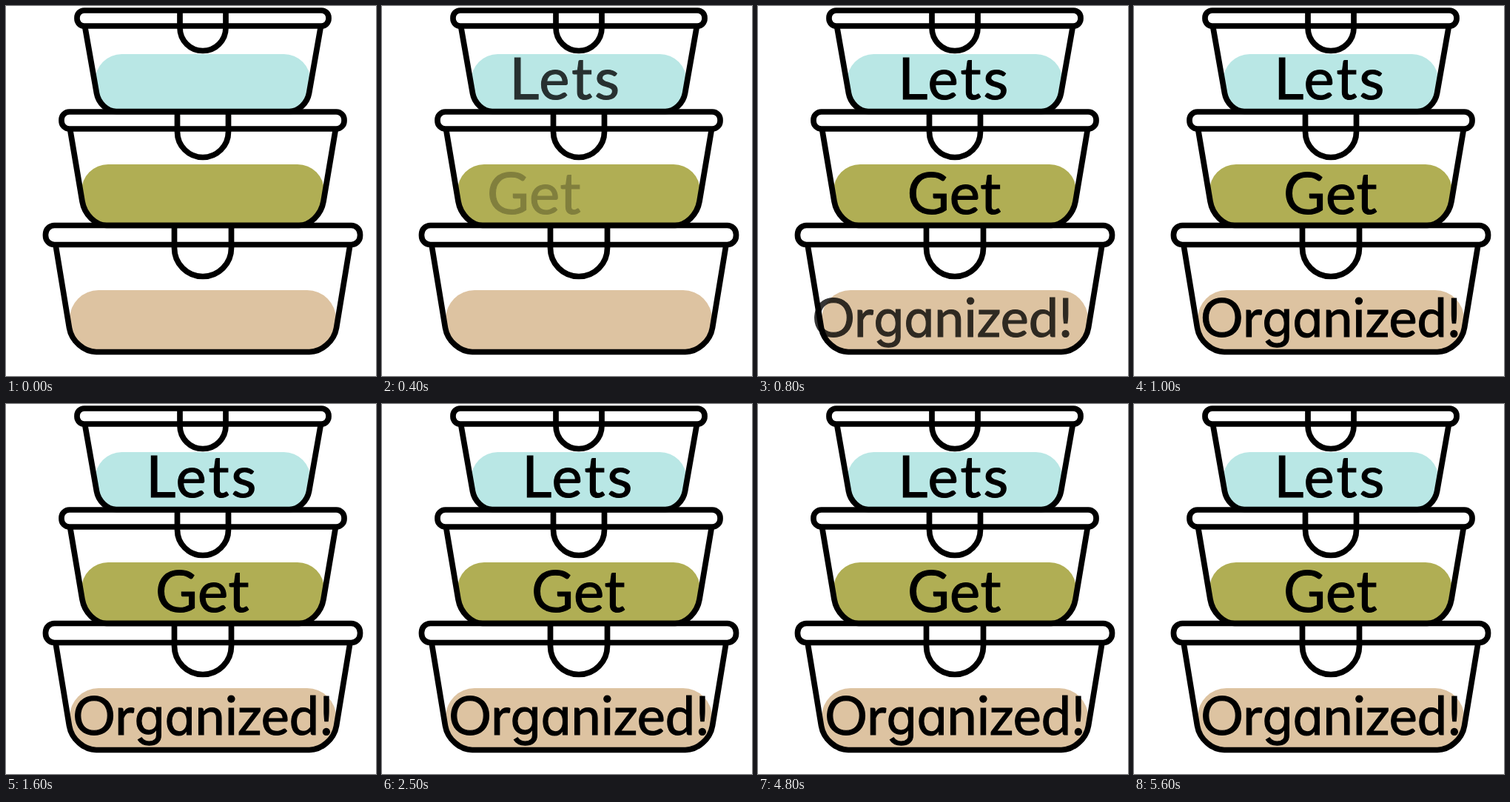
An HTML page for the animation above (6000 ms loop, 500 by 500 pixels).

```html
<!DOCTYPE html>
<html lang="en">
<head>
<meta charset="utf-8">
<title>Stacked containers</title>
<style>
  html, body { margin: 0; width: 100%; height: 100%; overflow: hidden; background: #fff; }
  svg { display: block; width: 100vw; height: 100vh; }
  .line { fill: none; stroke: #000; stroke-width: 7.7; stroke-linejoin: round; }
  text { font-family: Lato, sans-serif; fill: #000; stroke: #000; stroke-width: 1.2; white-space: pre; }
  .round { font-family: Inter, sans-serif; font-size: 0.93em; font-feature-settings: "cv11"; }
</style>
</head>
<body>
<svg id="stage" viewBox="0 0 500 500"></svg>
<script>
const LOOP = 6000, STEP = 100;
const CX = 266;
const stage = document.getElementById('stage');

// Widths are half-widths measured from the centre line.
const boxes = [
  { lid: { top: 6, bottom: 27, half: 170 }, tab: { half: 31, bottom: 60.5 },
    body: { rim: 159.5, side: 143.5, sideY: 118, flat: 117, bottom: 142.5 },
    fill: { half: 145.5, y: 65, r: 36, color: '#b9e7e5' },
    label: { parts: ['Lets'], x: 189.3, y: 126.3, size: 78, spacing: 3, start: 100 } },
  { lid: { top: 143, bottom: 166, half: 191 }, tab: { half: 34.5, bottom: 204.5 },
    body: { rim: 179.5, side: 163, sideY: 264, flat: 130, bottom: 296.5 },
    fill: { half: 164, y: 214, r: 36, color: '#b0ae54' },
    label: { parts: ['Get'], x: 202, y: 280.7, size: 78, spacing: 0.5, start: 300 } },
  { lid: { top: 296.5, bottom: 322.5, half: 212.5 }, tab: { half: 38.5, bottom: 365.5 },
    body: { rim: 199, side: 180.5, sideY: 435, flat: 144, bottom: 467.5 },
    fill: { half: 180, y: 384, r: 39, color: '#ddc3a1' },
    label: { parts: ['Or', 'ga', 'nized!'], x: 90.3, y: 447, size: 72, spacing: 0, start: 500 } }
];

function add(parent, name, attrs) {
  const node = document.createElementNS('http://www.w3.org/2000/svg', name);
  for (const key in attrs) node.setAttribute(key, attrs[key]);
  return parent.appendChild(node);
}

function bodyPath({ lid, body }) {
  const { rim, side, sideY, flat, bottom } = body;
  const bend = 0.55, drop = (bottom - sideY) * bend;
  const slope = (rim - side) / (sideY - lid.bottom);
  const c1 = [side - slope * drop, sideY + drop];
  const c2 = flat + (side - flat) * (1 - bend);
  return `M${CX - rim} ${lid.bottom}L${CX - side} ${sideY}` +
    `C${CX - c1[0]} ${c1[1]} ${CX - c2} ${bottom} ${CX - flat} ${bottom}H${CX + flat}` +
    `C${CX + c2} ${bottom} ${CX + c1[0]} ${c1[1]} ${CX + side} ${sideY}L${CX + rim} ${lid.bottom}`;
}

function drawBox(box, index) {
  const { lid, tab, fill } = box;
  const shape = bodyPath(box);
  const clip = add(stage, 'clipPath', { id: 'body' + index });
  add(clip, 'path', { d: shape + 'Z' });
  add(stage, 'rect', {
    x: CX - fill.half, y: fill.y, width: fill.half * 2, height: 140,
    rx: fill.r, fill: fill.color, 'clip-path': `url(#body${index})`
  });
  add(stage, 'path', { class: 'line', d: shape });
  const height = lid.bottom - lid.top;
  add(stage, 'rect', {
    class: 'line', x: CX - lid.half, y: lid.top,
    width: lid.half * 2, height, rx: height * 0.46
  });
  add(stage, 'path', {
    class: 'line',
    d: `M${CX - tab.half} ${lid.top}V${tab.bottom - tab.half}` +
      `a${tab.half} ${tab.half} 0 0 0 ${tab.half * 2} 0V${lid.top}`
  });
}

function drawLabel({ label }) {
  const node = add(stage, 'text', {
    x: label.x, y: label.y, 'font-size': label.size, 'letter-spacing': label.spacing
  });
  label.parts.forEach((part, i) => {
    add(node, 'tspan', i === 1 ? { class: 'round' } : {}).textContent = part;
  });
  return { node, start: label.start };
}

boxes.forEach(drawBox);
const labels = boxes.map(drawLabel);

const progress = (time, duration) => Math.min(1, Math.max(0, time / duration));

function render(time) {
  const now = Math.floor(time % LOOP / STEP) * STEP;
  for (const { node, start } of labels) {
    const slide = -91 * (1 - progress(now - start, 530)) ** 2;
    node.setAttribute('transform', `translate(${slide.toFixed(2)} 0)`);
    node.setAttribute('opacity', progress(now - start, 380));
  }
}

const origin = performance.now();
function tick() {
  render(performance.now() - origin);
  requestAnimationFrame(tick);
}
tick();
</script>
</body>
</html>
```
